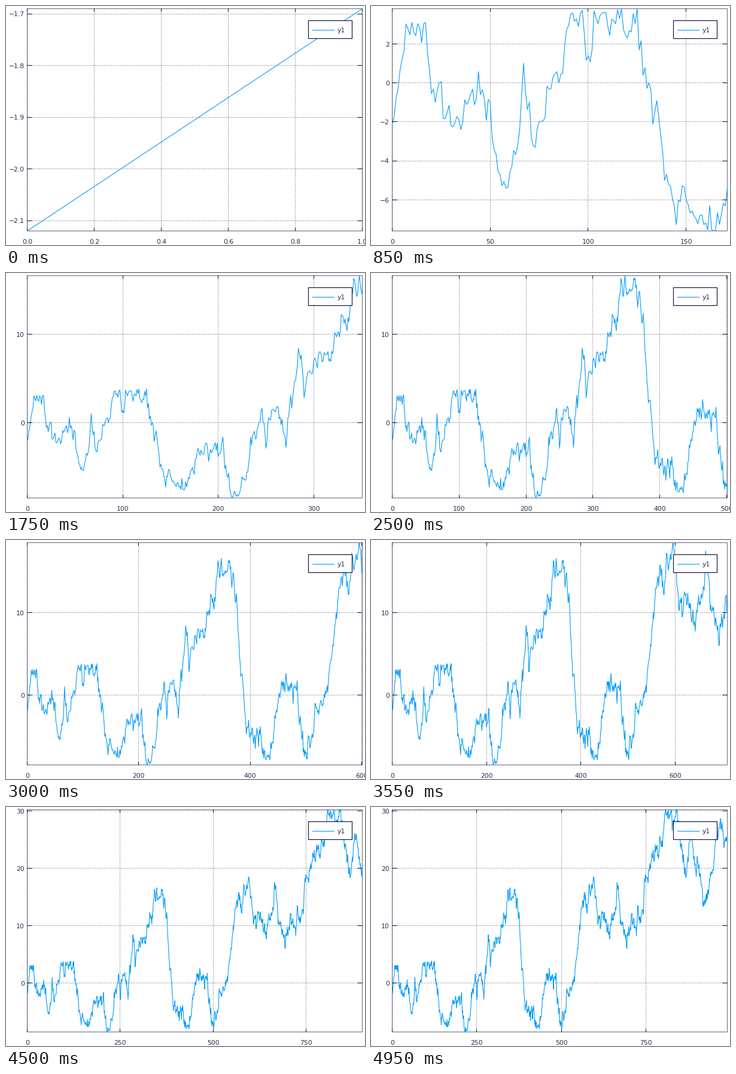
A matplotlib script for the animation above (5000 ms loop, 600 px wide and 400 px high).

```python
import math

import matplotlib.pyplot as plt
import numpy as np
from matplotlib.animation import FuncAnimation
from matplotlib.collections import LineCollection
from matplotlib.patches import Rectangle

W, H, DPI = 600, 400, 100
LEFT, RIGHT, TOP, BOTTOM = 35, 595, 4, 376
FRAMES, INTERVAL = 100, 50
INK, BLUE = "#14143a", "#009afa"
PX = 72 / DPI  # one pixel in points

# Main peaks and valleys of the walk.
TURNS = [(0, -2.12), (1, -1.69), (5, 1.2), (17, 3.1), (35, -2.4), (45, -0.6),
         (58, -5.4), (67, 1), (75, -2), (92, 3.6), (125, 3.8), (140, -4.7),
         (164, -7.6), (179, -2.9), (215, -8.5), (255, 0.3), (272, -1.5),
         (284, 8.4), (291, 3.5), (348, 16.6), (371, 13.5), (390, -2),
         (427, -7.8), (465, 1.9), (480, 1.2), (498, -6.7), (532, -0.5),
         (560, 13), (596, 18.5), (635, 9), (665, 17.5), (701, 8.2),
         (747, 18.3), (805, 28.2), (841, 30.2), (865, 19), (885, 26),
         (923, 13.6), (975, 28), (991, 24.7)]


def make_walk():
    """Join the turns with random noise that never passes an earlier extreme."""
    knots, levels = np.array(TURNS).T
    knots = knots.astype(int)
    x = np.arange(knots[-1] + 1)
    noise = np.random.default_rng(7).normal(0, 0.8, len(x))
    for i in x[1:]:
        noise[i] += 0.85 * noise[i - 1]
    y = np.interp(x, knots, levels) + noise - np.interp(x, knots, noise[knots])
    seg = np.searchsorted(knots, x)
    low = np.minimum.accumulate(levels)[seg]
    high = np.maximum.accumulate(levels)[seg]
    y = high - abs(high - y)
    return x, low + abs(y - low)


def find_ticks(lo, hi):
    """Score candidate steps by count, coverage and niceness."""
    span = hi - lo
    ideal = 6 if span <= 1 else 5
    top = math.ceil(math.log10(span))
    best = None
    for z in range(top - 2, top + 1):
        for q, nice in ((1, 1), (5, 0.9), (2, 0.7), (2.5, 0.5), (3, 0.2)):
            step = q * 10.0 ** z
            first, last = math.floor(lo / step), math.ceil(hi / step)
            k = max(4, last - first + 1)
            count = max(0, 1 - abs(k - ideal) / ideal)
            cover = 1.5 * span / ((k - 1) * step)
            score = 0.25 * count + 0.36 * cover + 0.25 * nice
            rank = (round(score, 9), -k)
            if best is None or rank > best[0]:
                digits = max(0, (q == 2.5) - z)
                best = rank, step, first, last, digits
    _, step, first, last, digits = best
    eps = span * 1e-9
    values = [r * step for r in range(first, last + 1)
              if lo - eps <= r * step <= hi + eps]
    return [(v, f"{v:.{digits}f}".replace("-", "\u2212")) for v in values]


X, Y = make_walk()

plt.rcParams["font.family"] = "DejaVu Sans"
fig = plt.figure(figsize=(W / DPI, H / DPI), dpi=DPI, facecolor="white")
ax = fig.add_axes([0, 0, 1, 1])
ax.set_xlim(0, W)
ax.set_ylim(H, 0)
ax.axis("off")

FONT = dict(fontsize=10.8 * PX, color="#28284e", va="baseline")

grid = LineCollection([], colors=INK, alpha=0.75, linewidths=PX,
                      linestyles=[(0.5, (1, 2))], zorder=1)
marks = LineCollection([], colors=INK, linewidths=1.1 * PX, zorder=4)
ax.add_collection(grid)
ax.add_collection(marks)
ax.add_patch(Rectangle((LEFT, TOP), RIGHT - LEFT, BOTTOM - TOP, fill=False,
                       ec=INK, alpha=0.65, lw=PX, zorder=2))
curve, = ax.plot([], [], color=BLUE, lw=1.1 * PX, zorder=3,
                 solid_joinstyle="round")

ax.add_patch(Rectangle((505, 24), 73, 30, fc="white", ec=INK,
                       lw=1.2 * PX, zorder=5))
ax.plot([512, 548], [40, 40], color=BLUE, lw=1.1 * PX, zorder=6)
ax.text(554, 44.5, "y1", ha="left", zorder=6, **FONT)

x_labels = [ax.text(0, 398, "", ha="center", **FONT) for _ in range(12)]
y_labels = [ax.text(31, 0, "", ha="right", **FONT) for _ in range(12)]


def set_labels(pool, items):
    for label in pool:
        label.set_text("")
    for label, (x, y, text) in zip(pool, items):
        label.set_position((x, y))
        label.set_text(text)


def update(i):
    end = 1 + 10 * i
    x, y = X[:end + 1], Y[:end + 1]
    lo, hi = y.min(), y.max()

    def px(v):
        return LEFT + 0.5 + (RIGHT - LEFT) * v / end

    def py(v):
        return BOTTOM + 0.5 - (BOTTOM - TOP) * (v - lo) / (hi - lo)

    curve.set_data(px(x), py(y))
    lines, ticks, below, beside = [], [], [], []
    for v, text in find_ticks(0, end):
        p = math.floor(px(v))
        lines.append([(p, BOTTOM), (p, TOP)])
        ticks += [[(p, BOTTOM), (p, BOTTOM - 5)], [(p, TOP), (p, TOP + 5)]]
        below.append((px(v), 398, text))
    for v, text in find_ticks(lo, hi):
        p = math.floor(py(v))
        lines.append([(LEFT, p), (RIGHT, p)])
        ticks += [[(LEFT, p), (LEFT + 8, p)], [(RIGHT, p), (RIGHT - 8, p)]]
        beside.append((31, py(v) + 4.3, text))
    grid.set_segments(lines)
    marks.set_segments(ticks)
    set_labels(x_labels, below)
    set_labels(y_labels, beside)
    return curve, grid, marks, *x_labels, *y_labels


anim = FuncAnimation(fig, update, frames=FRAMES, interval=INTERVAL,
                     repeat=True, repeat_delay=0, blit=False)
plt.show()
```
